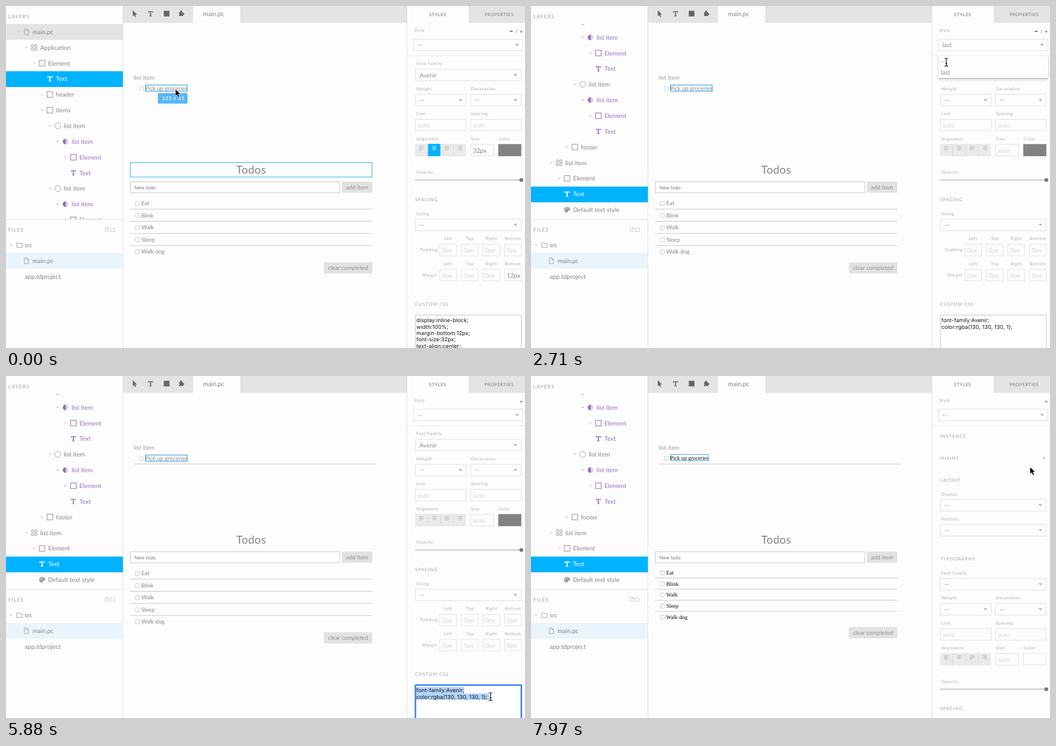
Recreate the animation shown at these times as an HTML page. Size 921 by 608 pixels, loop 8 s.

```html
<!DOCTYPE html>
<html lang="en">
<head>
<meta charset="utf-8">
<title>Style editor</title>
<style>
html, body { margin: 0; width: 100%; height: 100%; overflow: hidden; background: #fdfdfd; }
svg { display: block; width: 100vw; height: 100vh; }
text { font-family: Lato, sans-serif; white-space: pre; text-rendering: geometricPrecision; }
.sans { font-family: Inter, sans-serif; }
.serif { font-family: "Liberation Serif", serif; }
</style>
</head>
<body>
<svg viewBox="0 0 921 608" xmlns="http://www.w3.org/2000/svg">
  <defs>
    <clipPath id="layersClip"><rect y="32" width="208" height="347"/></clipPath>
    <clipPath id="panelClip"><rect x="712" y="89" width="209" height="519"/></clipPath>
    <filter id="shadow" x="-10%" y="-20%" width="120%" height="160%">
      <feDropShadow dx="0" dy="1.5" stdDeviation="1.8" flood-opacity=".35"/>
    </filter>
  </defs>
  <g id="scene"></g>
  <g id="cursor">
    <path id="arrow" d="M-.5 -.5V12.5L2.500 9.800L4.600 14.500L7 13.400L5 8.900H9Z" fill="#000" stroke="#fff" stroke-width=".8"/>
    <g id="beam" fill="none" stroke-linecap="round">
      <path d="M-3 -7Q0 -7 0 -5Q0 -7 3 -7M0 -5V5M-3 7Q0 7 0 5Q0 7 3 7M-1.5 2H1.5" stroke="#fff" stroke-width="2.6"/>
      <path d="M-3 -7Q0 -7 0 -5Q0 -7 3 -7M0 -5V5M-3 7Q0 7 0 5Q0 7 3 7M-1.5 2H1.5" stroke="#111" stroke-width="1.2"/>
    </g>
  </g>
</svg>
<script>
const LOOP = 8000;
const BLUE = '#00b3ff', PURPLE = '#966dc0', GRAY = '#848484', EDGE = '#dedede';
const $ = id => document.getElementById(id);

// y is the middle of the capitals
const text = (x, y, str, size = 11, fill = GRAY, attrs = '') =>
  `<text x="${x}" y="${y + size * .36}" font-size="${size}" fill="${fill}" ${attrs}>${str}</text>`;
const rect = (x, y, w, h, fill, stroke = 'none', attrs = '') =>
  `<rect x="${x}" y="${y}" width="${w}" height="${h}" fill="${fill}" stroke="${stroke}" ${attrs}/>`;
const path = (d, stroke, width = 1, fill = 'none') =>
  `<path d="${d}" fill="${fill}" stroke="${stroke}" stroke-width="${width}"/>`;
const at = (x, y, body) => `<g transform="translate(${x} ${y})">${body}</g>`;
const label = (x, y, str, attrs = '') => text(x, y, str, 7.8, '#adadad', 'letter-spacing=".55" ' + attrs);
const heading = (x, y, str, size = 8) => text(x, y, str, size, '#a0a0a0', 'letter-spacing="1"');
const box = (x, y, w, h = 21.5) => rect(x + .5, y + .5, w - 1, h - 1, '#fdfdfd', EDGE);
const field = (x, y, w, value, set) => box(x, y, w) + text(x + 4.5, y + 11.3, value, 11, set ? '#858585' : '#d4d4d4');
const select = (x, y, w, value = '--') => box(x, y, w) + text(x + 7.5, y + 11, value, 11, '#919191') +
  path(`M${x + w - 14} ${y + 9}h7l-3.5 3.8z`, 'none', 0, '#b2b2b2');

const icons = {
  doc: c => path('M-3.5 -5H1L4 -2V5H-3.5ZM1 -5V-2H4', c, .9),
  grid: c => [[-5, -5], [1, -5], [-5, 1], [1, 1]].map(([x, y]) => rect(x, y, 4, 4, 'none', c, 'rx=".6"')).join(''),
  box: c => rect(-5, -5, 10, 10, 'none', c, 'stroke-width="1.1"'),
  type: c => path('M-4.5 -4.5H4.5V-1.9H3.7L3.100 -3.200H1V3.5L2.300 3.900V4.6H-2.300V3.900L-1 3.5V-3.200H-3.100L-3.7 -1.9H-4.5Z', 'none', 0, c),
  ring: c => `<circle r="5.2" fill="none" stroke="${c}" stroke-width=".9"/>`,
  half: c => `<circle r="4.8" fill="${c}" opacity=".35"/>` + path('M0 -4.8A4.8 4.8 0 0 0 0 4.8Z', c, .4, c),
  folder: c => path('M-5 -4H-1.5L-.3 -2.6H5V4.2H-5Z', c, .9),
  palette: c => path('M0 -5C7 -5 6.500 2 3 1.500C0 1 2 5 0 5C-7 5 -7 -5 0 -5Z', 'none', 0, c) +
    [[-2.8, 0], [-1.4, -2.6], [1.6, -2.7]].map(([x, y]) => `<circle cx="${x}" cy="${y}" r=".9" fill="#fff"/>`).join('')
};
const icon = (name, x, y, c = '#989898') => at(x, y, icons[name](c));
const caret = (x, y, open, c = '#cbcbcb') =>
  path(open ? `M${x - 2.5} ${y - 1.2}h5l-2.5 2.8z` : `M${x - 1.2} ${y - 2.5}v5l3 -2.500z`, open ? 'none' : c, .7, open ? c : 'none');

// depth, icon, name, arrow (1 open, 0 closed, none if absent), purple
const item = d => [[d, 'ring', 'list item', 1], [d + 1, 'half', 'list item', 1, 1],
  [d + 2, 'box', 'Element', 0, 1], [d + 2, 'type', 'Text', , 1]];
const topRows = [[1, 'doc', 'main.pc', 1], [2, 'grid', 'Application', 1], [3, 'box', 'Element', 1],
  [4, 'type', 'Text'], [4, 'box', 'header', 0], [4, 'box', 'items', 1], ...item(5), ...item(5)];
const endRows = [...item(5), ...item(5), [4, 'box', 'footer', 0], [2, 'grid', 'list item', 1],
  [3, 'box', 'Element', 0], [3, 'type', 'Text'], [3, 'palette', 'Default text style']];

function layers(s) {
  const rows = s.edited ? endRows : topRows, first = s.edited ? 28 : 46;
  const picked = s.edited ? 11 : 3;
  const body = rows.map(([depth, name, title, arrow, purple], i) => {
    const y = first + i * 27.85, x = 22.3 + depth * 13.9, on = i === picked;
    const fill = on ? BLUE : i === 0 && !s.edited ? '#e3e3e3' : '';
    const color = on ? '#fff' : purple ? PURPLE : '';
    return (fill && rect(0, Math.round(y - 13.7), 207.5, 28, fill)) +
      (arrow === undefined ? '' : caret(x - 14, y, arrow, purple ? '#c9b5de' : undefined)) +
      icon(name, x, y, color || undefined) + text(x + 10.7, y, title, 10.85, color || GRAY);
  }).join('');
  return `<g clip-path="url(#layersClip)">${body}</g>` +
    rect(199.5, 242, 6.5, 135, '#7c7c7c', 'none', `rx="3.2" opacity="${s.bar}"`);
}

function sidebar(s) {
  return text(4, 18.5, 'LAYERS', 9, '#a2a2a2', 'letter-spacing="1.1"') +
    path('M207.5 0V608', EDGE) + layers(s) +
    path('M0 379.5H207', EDGE) + text(4, 398, 'FILES', 9, '#a2a2a2', 'letter-spacing="1.1"') +
    at(179, 397, `<g transform="scale(.75)">${icons.doc('#b0b0b0')}</g>`) +
    at(189, 397.5, `<g transform="scale(.75)">${icons.folder('#b0b0b0')}</g>`) +
    rect(0, 439, 207.5, 28, '#e9f4fd') + caret(9, 425, 1) +
    icon('folder', 24, 425) + text(33, 425, 'src') + icon('doc', 36, 453) + text(47, 453, 'main.pc') +
    text(33, 481, 'app.tdproject');
}

function toolbar() {
  return rect(208, 0, 503, 30, '#e4e4e4') + rect(332, 0, 83.5, 31, '#fdfdfd') +
    path('M225 7.500V18.500L227.500 16L229.300 19.800L231 19L229.200 15.300H232.500Z', 'none', 0, '#666') +
    icon('type', 256.5, 13.8, '#666') + rect(280, 8.500, 10, 10, '#666') +
    path('M307 11H309.300A1.800 1.800 0 1 1 312 11H314.300V13A1.500 1.500 0 1 1 314.300 15.700V18H312A1.500 1.500 0 0 0 309.300 18H307V15.700A1.500 1.500 0 0 0 307 13Z', 'none', 0, '#666') +
    text(349.500, 13.500, 'main.pc', 11.2);
}

const check = (x, y) => rect(x + .5, y + .5, 7, 7, '#fff', '#c2c2c2', 'rx="1.5" stroke-width=".9"');
const button = (x, y, w, str) => rect(x, y, w, 20, '#e2e2e2') +
  text(x + w / 2, y + 10, str, 10.3, '#909090', 'text-anchor="middle"');

function canvas(s) {
  const entry = (x, y, str) => s.plain ? text(x, y, str, 9.8, '#000', 'class="serif"') : text(x, y, str, 10.1, '#888');
  const pitch = s.plain ? 19.7 : 21.55, top = s.plain ? 349.5 : 350.5;
  const todos = ['Eat', 'Blink', 'Walk', 'Sleep', 'Walk dog'].map((name, i) => {
    const y = top + i * pitch;
    return check(229, y - 3.5) + entry(240, y, name) +
      (i < 4 ? path(`M220 ${y + pitch / 2 - .1}H650`, '#d2d2d2', 1.3) : '');
  }).join('');
  return (s.hover ? path('M208.5 192V30.5H711V192', '#b5d6ef') : '') +
    text(226.5, 127, 'list item', 10.7, '#9c9c9c') + check(236, 142.500) +
    entry(247, s.plain ? 145 : 146, 'Pick up groceries') +
    (s.plain ? rect(247.5, 139.5, 67.5, 11, 'none', '#36a9e1') : rect(247.5, 140.5, 74, 11, 'none', '#36a9e1', 'stroke-width="1.2"')) +
    (s.ruled ? path('M226.5 156.5H657', '#d2d2d2', 1.3) : '') +
    (s.badge ? rect(269.5, 155, 52.5, 18.500, '#57b5fb', 'none', 'rx="1"') +
      text(277, 164, '122 x 22', 8.5, '#fff', 'font-weight="700" letter-spacing=".8"') : '') +
    (s.edited ? '' : rect(220.5, 278.5, 429, 25.5, 'none', '#1fb0e4')) +
    text(408.5, 290.5, 'Todos', 19.6, GRAY, 'letter-spacing=".45"') +
    rect(220.5, 312.5, 371.5, 19.5, '#fff', '#c6c6c6') + text(228, 323, 'New todo', 8.3, '#777', 'class="sans"') +
    button(596, 312, 54, 'add item') + todos + button(564, s.plain ? 446.3 : 455.5, 86, 'clear completed');
}

function alignment(centered) {
  return [0, 1, 2, 3].map(i => {
    const x = 726 + i * 22.6, on = centered && i === 1, mid = x + 11.3;
    const lines = [8, 5, 8, 4].map((w, k) => {
      const left = [mid - 4, mid - w / 2, mid - 4, mid + 4 - w][i];
      return `M${left} ${249.700 + k * 2.1}h${i === 2 ? 8 - (k === 3) * 3 : w}`;
    }).join('');
    return rect(x, 245, 22.6, 22, on ? BLUE : '#eaeaea') + (i ? path(`M${x} 245V267`, '#d6d6d6') : '') +
      path(lines, on ? '#fff' : '#ababab', .8);
  }).join('');
}

function customCss(s) {
  const lines = s.plain ? [] : s.edited ? ['font-family:Avenir;', 'color:rgba(130, 130, 130, 1);']
    : ['display:inline-block;', 'width:100%;', 'margin-bottom:12px;', 'font-size:32px;', 'text-align:center;'];
  return rect(726.5, 549.5, 188, 80, '#fff', s.focus ? '#4d8ef0' : '#c4c4c4', s.focus ? 'stroke-width="3" rx="1"' : '') +
    (s.marked ? rect(728, 553, 85, 11.4, '#b1d3fa') + rect(728, 564.4, 130, 11.4, '#b1d3fa') : '') +
    lines.map((line, i) => text(728.3, 558.7 + i * 11.35, line, 9.6, '#111', 'class="sans" letter-spacing=".08"')).join('');
}

function properties(s) {
  const sides = ['Left', 'Top', 'Right', 'Bottom'];
  const edges = (y, name, last) => label(766, y + 20, name, 'text-anchor="end"') + sides.map((side, i) =>
    label(784.7 + i * 38.3, y, side, 'text-anchor="middle"') +
    field(769.2 + i * 38.3, y + 9.7, 31, i === 3 && last ? last : '0px', i === 3 && last)).join('');
  return heading(726, -140, 'INSTANCE') + heading(726, -101, 'MIXINS') + path('M907.500 -101.500h5m-2.500 -2.500v5', '#aaa', .9) +
    heading(726, -62.5, 'LAYOUT') + label(728, -37.5, 'Display') + select(726, -28.5, 188.500) +
    label(728, 6.5, 'Position') + select(726, 16, 188.500) + heading(726, 77.5, 'TYPOGRAPHY') +
    label(728, 102.5, 'Font Family') + select(726, 112, 188.500, s.plain ? '--' : 'Avenir') +
    label(728, 147, 'Weight') + label(825, 147, 'Decoration') + select(726, 156.5, 91) + select(824, 156.5, 90.500) +
    label(728, 191.5, 'Line') + label(825, 191.5, 'Spacing') + field(726, 201, 91, 'auto') + field(824, 201, 90.500, 'auto') +
    label(728, 236, 'Alignment') + label(825, 236, 'Size') + label(874, 236, 'Color') + alignment(!s.edited) +
    field(824, 245.500, 42, s.edited ? 'auto' : '32px', !s.edited) +
    (s.plain ? box(873, 245, 41.500) : rect(873.5, 245.5, 41, 21.5, '#828282')) +
    label(728, 295.5, 'Opacity') + path('M726 309.300H914', '#d0d0d0', 2.500) + '<circle cx="914.5" cy="309.3" r="3.4" fill="#777"/>' +
    heading(726, 344, 'SPACING') + label(728, 369.5, 'Sizing') + select(726, 378.5, 188.500) +
    edges(413.5, 'Padding') + edges(458, 'Margin', s.edited ? '' : '12px') +
    heading(726, 530.500, 'CUSTOM CSS') + customCss(s);
}

function panel(s) {
  const tab = (x, str, fill) => text(x, 14.7, str, 7.8, fill, 'text-anchor="middle" letter-spacing=".65"');
  return `<g clip-path="url(#panelClip)">${at(0, s.scroll, properties(s))}</g>` +
    rect(821, 0, 100, 30, '#e4e4e4') + tab(766, 'STYLES', '#666') + tab(875, 'PROPERTIES', '#777') +
    label(724, 43, 'Style') + select(722.5, 58.500, 195, s.edited && !s.ruled ? 'last' : '--') +
    (s.ruled ? '' : path('M894 45h5', '#555', 1.6) + text(904, 45, '/', 9, '#777')) +
    path('M911.800 45.500h5m-2.500 -2.500v5', '#777', .9) +
    path('M712 88.5H921', '#e8e8e8') + path('M711.5 0V608', EDGE) +
    (s.menu ? rect(723, 88.5, 195, 39.5, '#fdfdfd', 'none', 'filter="url(#shadow)"') +
      text(727, 99.5, '--', 11, '#8c8c8c') + text(727, 118, 'last', 11, '#8c8c8c') : '');
}

// start, end, steps, waypoints
const glides = [
  [1070, 1070, 1, [[354, 139]]],
  [1250, 1560, 4, [[560, 75], [740, 58], [768, 72]]],
  [2010, 2010, 1, [[759, 73]]],
  [2160, 2390, 3, [[748, 92], [737, 100]]],
  [3250, 4050, 8, [[755, 130], [790, 170], [815, 225], [828, 275]]],
  [4140, 4750, 8, [[818, 350], [809, 425], [812, 465]]],
  [4930, 5410, 6, [[825, 515], [848, 555], [860, 570]]],
  [6440, 6440, 1, [[842, 554]]],
  [6590, 6710, 2, [[835, 475], [831, 440]]],
  [7370, 7970, 6, [[814, 330], [802, 210], [822, 112], [866, 125], [886, 162]]]
];
const stepsDone = (t, start, end, steps) => t < start ? 0
  : steps === 1 ? 1 : Math.min(steps, 1 + Math.floor((t - start) / (end - start) * (steps - 1) + .001)) / steps;

function pointer(t) {
  let spot = [301, 148];
  for (const [start, end, steps, points] of glides) {
    if (t < start) break;
    const route = [spot, ...points], u = stepsDone(t, start, end, steps) * points.length;
    const i = Math.min(points.length - 1, Math.floor(u)), f = u - i;
    spot = route[i].map((v, k) => v + (route[i + 1][k] - v) * f);
  }
  return spot;
}

let shown = '';
function render(t) {
  const s = {
    edited: t >= 710, badge: t < 530, hover: t >= 530 && t < 1800, menu: t >= 1800 && t < 2800,
    ruled: t >= 2800, focus: t >= 5410, marked: t >= 5880 && t < 6240, plain: t >= 6240,
    bar: t < 710 ? 0 : 1 - stepsDone(t, 1250, 1560, 4),
    scroll: t < 7040 ? 0 : t < 7160 ? 165 : 247.5
  };
  const key = JSON.stringify(s);
  if (key !== shown) {
    shown = key;
    $('scene').innerHTML = rect(0, 0, 921, 608, '#fdfdfd') + toolbar() + canvas(s) + sidebar(s) + panel(s);
  }
  const [x, y] = pointer(t);
  const beam = t >= 2390 && t < 3364 || t >= 5218 && t < 7370;
  $('cursor').setAttribute('transform', `translate(${x} ${y})`);
  $('arrow').style.display = beam ? 'none' : '';
  $('beam').style.display = beam ? '' : 'none';
}

const began = performance.now();
function tick() {
  render((performance.now() - began) % LOOP);
  requestAnimationFrame(tick);
}
tick();
</script>
</body>
</html>
```
